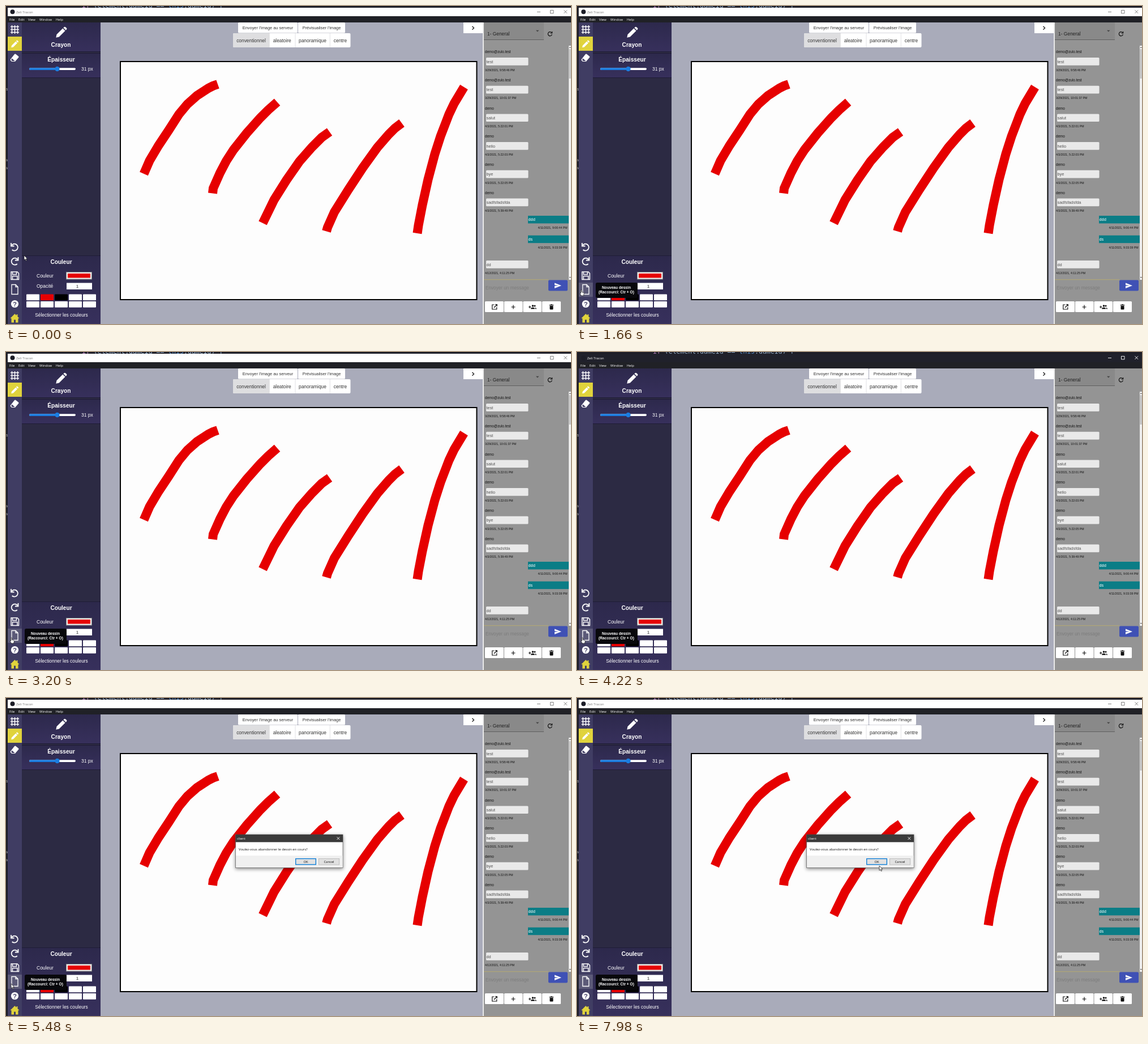
These frames come from a looping animation (998 by 561 pixels, 8000 ms). An HTML page:

```html
<!DOCTYPE html>
<html lang="fr">
<head>
<meta charset="utf-8">
<title>Dessin</title>
<style>
html, body { margin: 0; width: 100%; height: 100%; overflow: hidden; background: #1d1d26; }
svg { display: block; width: 998px; height: 561px; font-family: "Liberation Sans", Arial, sans-serif; }
text { white-space: pre; }
.ui { font-family: "Open Sans", sans-serif; font-size: 5.9px; }
.mono { font-family: "DejaVu Sans Mono", monospace; font-size: 11.5px; }
.mid { text-anchor: middle; }
.end { text-anchor: end; }
.bold { font-weight: bold; }
.line { fill: none; stroke: currentColor; }
.titlebar, .titlebar-bg, .hover, .dialog, .hand, .arrow { animation: 8s step-end infinite; }
.titlebar { color: #777; animation-name: title-ink; }
.titlebar-bg { fill: #fff; animation-name: title-bg; }
.hover { animation-name: hover; }
.dialog { animation-name: dialog; filter: drop-shadow(0 2px 3px #0007); }
.hand { animation-name: hand; }
.arrow { animation-name: arrow; }
.cursor { animation: move 8s linear infinite; }
@keyframes title-ink { 0% { color: #777; } 52.25% { color: #fff; } 57% { color: #777; } }
@keyframes title-bg { 0% { fill: #fff; } 52.25% { fill: #20212b; } 57% { fill: #fff; } }
@keyframes hover { 0% { opacity: 0; } 12.5% { opacity: 1; } }
@keyframes dialog { 0% { opacity: 0; } 57% { opacity: 1; } }
@keyframes hand { 0% { opacity: 0; } 9% { opacity: 1; } 57% { opacity: 0; } }
@keyframes arrow { 0% { opacity: 1; } 9% { opacity: 0; } 57% { opacity: 1; } }
@keyframes move {
  0%, 3.75% { transform: translate(32px, 440px); }
  8.75% { transform: translate(20px, 480px); }
  12.5% { transform: translate(9px, 500px); }
  20%, 25% { transform: translate(7px, 501px); }
  39%, 73.75% { transform: translate(9px, 504px); }
  78.75% { transform: translate(180px, 410px); }
  83.75% { transform: translate(472px, 262px); }
  85.5%, 88% { transform: translate(491px, 255px); }
  96.25%, 100% { transform: translate(534px, 296px); }
}
</style>
</head>
<body>
<svg viewBox="0 0 998 561">
  <defs>
    <linearGradient id="panel" x2="0" y2="1">
      <stop stop-color="#2d294c"/><stop offset="1" stop-color="#37305c"/>
    </linearGradient>
    <path id="pencil" d="M-8 8l1-5L3-7l4 4L-3 7zM4-8l1.5-1.3q1-.7 2 .2l1.8 1.8q.8 1 0 2L8-4z"/>
  </defs>

  <!-- code editor behind the window -->
  <rect width="998" height="561" fill="#1d1d26"/>
  <text class="mono" x="134" y="2.6" fill="#8fa9c4"><tspan fill="#b07bb5">if</tspan> (element.gameId == <tspan fill="#4f86c0">this</tspan>.gameId) {</text>
  <g fill="#aaa" font-size="7"><text x="0" y="149">s</text><text x="0" y="274">v</text><text x="0" y="288">v</text></g>

  <!-- window frame -->
  <rect class="titlebar-bg" x="3" y="3" width="995" height="15.5"/>
  <g class="titlebar">
    <circle cx="11.5" cy="10.3" r="4" fill="#1c1d27"/>
    <text class="ui" x="18" y="12.6" fill="currentColor">Zeli Tracon</text>
    <path class="line" stroke-width=".9" d="M938 10.5h6M961.5 7.5h5.5v5.5h-5.5zM985.5 7.3l5.6 5.6m0-5.6l-5.6 5.6"/>
  </g>
  <rect x="3" y="18" width="995" height="11" fill="#202126"/>
  <g class="ui" fill="#fff">
    <text x="6" y="25.6">File</text><text x="22" y="25.6">Edit</text><text x="39" y="25.6">View</text>
    <text x="59" y="25.6">Window</text><text x="88" y="25.6">Help</text>
  </g>

  <!-- tool column -->
  <rect x="3" y="29" width="25" height="532" fill="#403d63"/>
  <rect x="3" y="54" width="25" height="25" fill="#e0d33c"/>
  <rect class="hover" x="3" y="488" width="25" height="25" fill="#5c5a78"/>
  <g color="#fff" fill="#fff" stroke-width="1.8">
    <path class="line" stroke-width="1.4" d="M8 36.5h15M8 41.5h15M8 46.5h15M10.5 34v15M15.5 34v15M20.5 34v15"/>
    <use href="#pencil" transform="translate(15 67.5) scale(.72)"/>
    <path d="M8 94l7-9q1-1 2-.3l5 4q1 1 .2 2L16 98H10l-2-2q-.7-1 0-2z"/>
    <path d="M10.3 92.4l5.5 4.6h-5l-1.5-1.8z" fill="#403d63"/>
    <path id="undo" class="line" d="M9 418v5.500h5.500M9.500 423a6 6 0 1 1 1.200 7"/>
    <use href="#undo" transform="translate(30.500 25) scale(-1 1)"/>
    <path class="line" stroke-width="1.5" d="M9 469h11l2.500 2.500v11h-13.500zM11.500 469v4.500h7v-4.500M11.500 482v-5.500h8.500v5.500"/>
    <path class="line" stroke-width="1.3" d="M10 491.500h7l4 4v13h-11zM17 491.500v4h4"/>
    <circle cx="15.500" cy="525.500" r="6.600"/>
    <text class="mid bold" x="15.500" y="529.500" font-size="11" fill="#403d63">?</text>
    <path fill="#e0d33c" d="M7.500 551l8-8 3 3v-2h2v4l3 3h-2v7.500h-4.500v-5h-3v5H9.500V551z"/>
  </g>

  <!-- settings panel -->
  <rect x="28" y="29" width="139" height="532" fill="#2c2a43"/>
  <g fill="url(#panel)">
    <rect x="28" y="29" width="139" height="51"/>
    <rect x="28" y="84" width="139" height="42"/>
    <rect x="28" y="441" width="139" height="120"/>
  </g>
  <path stroke="#1f1c36" d="M28 80.500h139M28 83.500h139M28 126.500h139M28 440.500h139"/>
  <g fill="#fff" font-size="8.500">
    <use href="#pencil" transform="translate(97 47) scale(1.080)"/>
    <g class="mid bold" font-size="10.100">
      <text x="97" y="72.300">Crayon</text><text x="97.500" y="98">Épaisseur</text><text x="97.500" y="455.200">Couleur</text>
    </g>
    <rect x="41" y="109.300" width="82" height="3.600" rx="1.800"/>
    <rect x="41" y="109.300" width="50" height="3.600" rx="1.800" fill="#1b7de0"/>
    <circle cx="90.500" cy="111" r="4.200" fill="#1b7de0"/>
    <text x="133" y="114">31 px</text>
    <text x="54" y="478.500">Couleur</text>
    <text x="54" y="497">Opacité</text>
    <rect x="106.500" y="469.500" width="45" height="12.500" fill="#efefef" stroke="#888"/>
    <rect x="109" y="472" width="40" height="7.500" fill="#e60000"/>
    <rect x="107" y="488.500" width="45" height="11.500"/>
    <text class="mid" x="126" y="497" fill="#222" font-size="8">1</text>
    <g id="swatches"></g>
    <text class="mid" x="98" y="547.700" font-size="8.400">Sélectionner les couleurs</text>
  </g>

  <!-- workspace -->
  <rect x="167" y="29" width="676" height="532" fill="#a9abba"/>
  <rect x="202" y="98" width="629.500" height="420" fill="#fdfdfd" stroke="#000" stroke-width="2"/>
  <g class="line" color="#e60000" stroke-width="16">
    <path d="M243.500 296l10-23 16-27 18-27 18-28 15-18 17-15 20-13 8-4 8.500-3"/>
    <path d="M365 330.500l1-9 12-27 11-21 13-20 23-29 24-27 14-14 16-14"/>
    <path d="M453.500 383l20-41 22-35 23-33 22-25 17-17 14-10"/>
    <path d="M566 397.500l2-7 12-27 25-40 25-38 26-36 20-23 11-11 12-9"/>
    <path d="M726.500 401l2-14 7-36 10-45 12-45 10-31 15-39 9-19 17.500-29"/>
  </g>
  <g fill="#fff">
    <rect x="410" y="29" width="105" height="18.500" rx="1.500"/>
    <rect x="516" y="29" width="83" height="18.500" rx="1.500"/>
    <rect x="401" y="48" width="207.500" height="25" rx="2"/>
    <rect x="808" y="29" width="35" height="19"/>
  </g>
  <path fill="#dedee0" d="M403 48h62v25h-62q-2 0-2-2V50q0-2 2-2z"/>
  <path stroke="#d5d5d9" stroke-width=".7" d="M465.300 48v25M511 48v25M572.300 48v25"/>
  <path class="line" color="#222" stroke-width="1.400" d="M823.500 35.800l3 3-3 3"/>
  <g class="mid" fill="#333">
    <g font-size="7.400"><text x="462.500" y="41">Envoyer l'image au serveur</text><text x="557.500" y="41">Prévisualiser l'image</text></g>
    <g font-size="8.400">
      <text x="433" y="63.500">conventionnel</text><text x="487.700" y="63.500">aleatoire</text>
      <text x="541.500" y="63.500">panoramique</text><text x="590.500" y="63.500">centre</text>
    </g>
  </g>

  <!-- chat -->
  <rect x="842" y="29" width="156" height="532" fill="#949494"/>
  <rect x="842" y="29" width="2" height="532" fill="#e9e9e9"/>
  <path fill="#898989" d="M844 29h106v30.500H844z"/>
  <path stroke="#555" stroke-width=".8" d="M844 59.500h106"/>
  <text x="850" y="52" font-size="8.400" fill="#222">1- General</text>
  <path d="M936 42.800h5.500l-2.750 2.800z" fill="#444"/>
  <path class="line" color="#111" stroke-width="1.200" d="M963.800 47a3.600 3.600 0 1 0 .6 3.200M964.600 45v3h-3"/>
  <g id="messages"></g>
  <rect x="994" y="70" width="4" height="413" fill="#ededed"/>
  <rect x="994.600" y="76" width="3" height="52" fill="#bdbdbd"/>
  <path fill="#555" d="M994.800 74l1.500-2 1.500 2zM994.800 478l1.500 2 1.500-2z"/>
  <path stroke="#b6aa72" d="M844 482.700h114"/>
  <text x="847" y="499.500" font-size="8.200" fill="#7d7d7d">Envoyer un message</text>
  <rect x="958" y="483.500" width="34" height="19" rx="2" fill="#3f51b5"/>
  <path fill="#fff" d="M969 488.500l12 4.700-12 4.700v-3.800l7-.9-7-.9z"/>
  <g fill="#fff">
    <rect x="846" y="521" width="33" height="19" rx="1.500"/><rect x="880" y="521" width="32.500" height="19" rx="1.500"/>
    <rect x="913.500" y="521" width="32.500" height="19" rx="1.500"/><rect x="947" y="521" width="33" height="19" rx="1.500"/>
  </g>
  <g fill="#111" color="#111" stroke-width="1.200">
    <path class="line" d="M862.500 527h-3.700v8h8v-3.700M864 526.500h3.300v3.300M867 527l-5 5M896 527.500v7M892.500 531h7M923 531h4.500M925.300 528.800v4.500"/>
    <circle cx="930.500" cy="529" r="1.800"/><circle cx="934" cy="529" r="1.500"/>
    <path d="M927 534.500q0-2.700 3.500-2.700t3.500 2.700zM934.500 532q2.500.3 2.500 2.500h-2zM960.500 529h6v5.500q0 1-1 1h-4q-1 0-1-1zM959.800 527h2l.7-.8h2l.7.8h2v1.200h-7.400z"/>
  </g>

  <!-- tooltip -->
  <g class="hover">
    <rect x="33" y="488" width="74" height="27" rx="3" fill="#08080c"/>
    <g class="mid bold" fill="#fff" font-size="6.650"><text x="69.500" y="499">Nouveau dessin</text><text x="69.500" y="507">(Raccourci: Ctr + O)</text></g>
  </g>

  <g class="dialog">
    <rect x="405.500" y="241" width="189.500" height="58.500" fill="#fff" stroke="#555" stroke-width=".7"/>
    <rect x="405.500" y="241" width="189.500" height="13.300" fill="#3b3b3b"/>
    <rect x="406" y="278" width="188.500" height="21" fill="#f0f0f0"/>
    <path class="line" color="#fff" stroke-width=".9" d="M584.500 245.200l4.800 4.800m0-4.800l-4.800 4.800"/>
    <rect x="511.700" y="283.500" width="35.600" height="10.300" fill="#e1e1e1" stroke="#0078d7" stroke-width="1.300"/>
    <rect x="552.300" y="283.300" width="36.400" height="10.800" fill="#e1e1e1" stroke="#adadad" stroke-width=".7"/>
    <g class="ui" fill="#111">
      <text x="408" y="249.500" fill="#fff">client</text>
      <text x="411" y="268.700">Voulez-vous abandonner le dessin en cours?</text>
      <text class="mid" x="529.500" y="291">OK</text><text class="mid" x="570.500" y="291">Cancel</text>
    </g>
  </g>

  <g class="cursor" fill="#fff" stroke="#111" stroke-width=".7" stroke-linejoin="round">
    <path class="arrow" d="M0 0v8.300l1.900-1.800 1.400 3 1.300-.6-1.400-2.900h2.600z"/>
    <path class="hand" d="M-.3.300q.9-.8 1.700.1v3.300l3.300.9q.8.400.7 1.500l-.7 3.900H.500l-2.300-3.500q0-1.300 1.500-.6z"/>
  </g>
</svg>
<script>
const node = (parent, tag, attrs, label = '') => {
  const el = document.createElementNS('http://www.w3.org/2000/svg', tag);
  for (const key in attrs) el.setAttribute(key, attrs[key]);
  el.textContent = label;
  parent.append(el);
};

const swatches = document.getElementById('swatches');
for (let i = 0; i < 10; i++) {
  node(swatches, 'rect', {
    x: 36 + (i % 5) * 25, y: i < 5 ? 508.5 : 521, width: 23, height: 10.7, rx: 1,
    fill: { 1: '#e60000', 2: '#000' }[i] || '#fff'
  });
}

const messages = document.getElementById('messages');
function received(y, sender, message, date) {
  node(messages, 'text', { x: 846, y: y - 7.7, 'font-size': 6.3, fill: '#111' }, sender);
  node(messages, 'rect', { x: 848, y, width: 74.5, height: 13.7, rx: 1.5, fill: '#e9e9e9' });
  node(messages, 'text', { x: 848.5, y: y + 9.5, 'font-size': 7.4, fill: '#555' }, message);
  node(messages, 'text', { x: 846, y: y + 23.7, 'font-size': 5.2, fill: '#111' }, date);
}
function sent(y, message, date) {
  node(messages, 'rect', { x: 922, y, width: 72, height: 13.5, fill: '#0b7d86' });
  node(messages, 'text', { x: 922.5, y: y + 9.3, 'font-size': 7.4, fill: '#fff' }, message);
  node(messages, 'text', { x: 991.5, y: y + 23.3, class: 'end', 'font-size': 5.2, fill: '#111' }, date);
}

[
  ['demo@zulo.test', 'test', '3/29/2021, 9:58:46 PM'],
  ['demo@zulo.test', 'test', '3/29/2021, 10:01:37 PM'],
  ['demo', 'salut', '4/3/2021, 5:22:01 PM'],
  ['demo', 'hello', '4/3/2021, 5:22:03 PM'],
  ['demo', 'bye', '4/3/2021, 5:22:05 PM'],
  ['demo', 'sadfsfadsfda', '4/3/2021, 5:39:49 PM']
].forEach((row, i) => received(91 + i * 49.7, ...row));
sent(370, 'ddd', '4/11/2021, 9:00:44 PM');
sent(404.7, 'ds', '4/11/2021, 9:33:39 PM');
received(449, '', 'dd', '4/12/2021, 4:11:25 PM');
</script>
</body>
</html>
```
